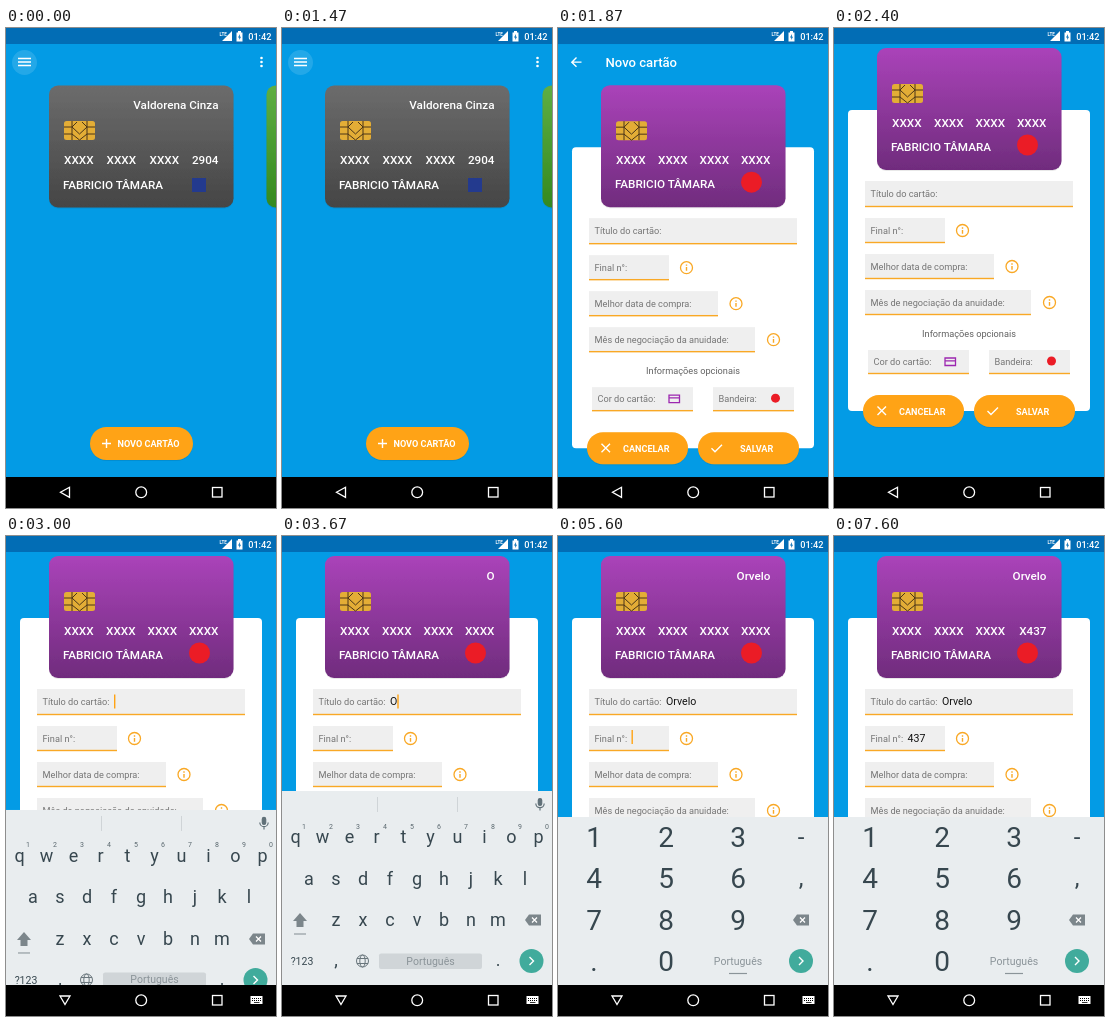
These frames come from a looping animation (270 by 480 pixels, 8000 ms). An HTML page:

```html
<!DOCTYPE html>
<html lang="pt">
<head>
<meta charset="utf-8">
<title>Novo cartão</title>
<style>
html, body { margin: 0; width: 100%; height: 100%; overflow: hidden; background: #000; }
svg { display: block; width: 100vw; height: 100vh; }
text { font-family: Roboto, "Noto Sans", sans-serif; font-size: 9.2px; }
.card text { fill: #fff; font-size: 11.7px; font-weight: 500; }
.mid { text-anchor: middle; }
.end { text-anchor: end; }
.btn text { fill: #fff; font-size: 9.1px; font-weight: 700; }
.line { fill: none; stroke: #fff; stroke-width: 1.4; }
.value { font-size: 10.6px; fill: #111; }
.key { fill: #37474f; text-anchor: middle; }
</style>
</head>
<body>
<svg viewBox="0 0 270 480" xmlns="http://www.w3.org/2000/svg">
  <defs>
    <linearGradient id="grey" x2="0" y2="1"><stop stop-color="#6c6c6c"/><stop offset="1" stop-color="#454545"/></linearGradient>
    <linearGradient id="purple" x2="0" y2="1"><stop stop-color="#aa43b9"/><stop offset="1" stop-color="#702c7d"/></linearGradient>
    <linearGradient id="green" x2="0" y2="1"><stop stop-color="#5fae43"/><stop offset="1" stop-color="#34891f"/></linearGradient>
    <filter id="shadow" x="-10%" y="-10%" width="120%" height="130%"><feDropShadow dx="0" dy=".6" stdDeviation=".7" flood-opacity=".15"/></filter>
    <clipPath id="fabClip"><rect x="84" y="399" width="103" height="33" rx="16.5"/></clipPath>
    <g id="chip">
      <rect x="58" y="93" width="31" height="19" rx="2.5" fill="#e3ad36"/>
      <path d="M58 99H66L73.500 106L81 99H89M58 106H66L73.500 112M89 106H81L73.500 112M66 93V112M81 93V112M66 99L71 94M81 99L76 94" fill="none" stroke="#4a3518"/>
    </g>
  </defs>

  <rect width="270" height="480"/>

  <g id="home">
    <rect y="16" width="270" height="433" fill="#039be5"/>
    <circle id="touch" cx="18.500" cy="34.500" r="12.500" fill="#fff" opacity=".13"/>
    <path class="line" d="M12 30.500H25M12 34H25M12 37.500H25"/>
    <g fill="#fff"><circle cx="255.500" cy="30" r="1.300"/><circle cx="255.500" cy="34" r="1.300"/><circle cx="255.500" cy="38" r="1.300"/></g>
    <g class="card">
      <rect x="43" y="57.500" width="184.500" height="122" rx="9" fill="url(#grey)" filter="url(#shadow)"/>
      <rect x="260.500" y="57.500" width="184" height="122" rx="9" fill="url(#green)" filter="url(#shadow)"/>
      <use href="#chip"/>
      <text class="end" x="212.500" y="81">Valdorena Cinza</text>
      <text x="58" y="136">XXXX</text><text x="100.500" y="136">XXXX</text><text x="143.500" y="136">XXXX</text>
      <text class="end" x="212.500" y="136">2904</text>
      <text x="57" y="160.500">FABRICIO TÂMARA</text>
      <rect x="186" y="150" width="14" height="14" fill="#233a8e"/>
    </g>
    <g class="btn">
      <rect x="84" y="399" width="103" height="33" rx="16.500" fill="#ffa314" filter="url(#shadow)"/>
      <circle id="ripple" cx="135" cy="416" fill="#fff" opacity=".3" clip-path="url(#fabClip)"/>
      <path class="line" d="M96 415.500H105M100.500 411V420"/>
      <text x="111.500" y="419">NOVO CARTÃO</text>
    </g>
  </g>

  <g id="form">
    <rect width="270" height="16" fill="#026db5"/>
    <rect y="16" width="270" height="433" fill="#039be5"/>
    <rect y="449" width="270" height="31"/>
    <g id="sheet">
      <path class="line" d="M23.500 34H14M18.500 29.300L13.800 34L18.500 38.700"/>
      <text x="47.500" y="39" fill="#fff" style="font-size:13.1px;font-weight:500">Novo cartão</text>
      <rect x="14" y="119" width="242" height="301" rx="4" fill="#fff"/>
      <g class="card">
        <rect x="43" y="57" width="184.500" height="122" rx="9" fill="url(#purple)" filter="url(#shadow)"/>
        <use href="#chip"/>
        <text id="cardTitle" class="end" x="212.500" y="80.500"></text>
        <text x="58" y="135.500">XXXX</text><text x="100" y="135.500">XXXX</text><text x="141.500" y="135.500">XXXX</text>
        <text id="cardEnd" class="end" x="212.500" y="135.500"></text>
        <text x="57" y="160">FABRICIO TÂMARA</text>
        <circle cx="193.500" cy="154" r="10.500" fill="#eb1c26"/>
      </g>
      <g id="fields"></g>
      <text class="mid" x="135" y="345.500" fill="#616161">Informações opcionais</text>
      <path d="M111 367h10.500v7.500h-10.500zM111 369.800h10.500" fill="none" stroke="#9c27b0" stroke-width="1.300"/>
      <circle cx="217.500" cy="370" r="4.500" fill="#eb1c26"/>
      <text id="title" class="value" x="108" y="206"></text>
      <text id="number" class="value" x="73.500" y="242.500"></text>
      <rect id="caret" width="1.400" height="14" fill="#ffa314"/>
      <g class="btn">
        <rect x="29" y="404" width="101" height="32" rx="16" fill="#ffa314" filter="url(#shadow)"/>
        <rect x="140" y="404" width="101" height="32" rx="16" fill="#ffa314" filter="url(#shadow)"/>
        <path class="line" d="M43.500 415.500L52 424M52 415.500L43.500 424M153.500 420L157 423.500L164 416.500"/>
        <text x="65" y="423.500">CANCELAR</text>
        <text x="182" y="423.500">SALVAR</text>
      </g>
    </g>
  </g>

  <rect width="270" height="16" fill="#026db5"/>
  <g fill="#fff">
    <text x="213.500" y="7.500" style="font-size:4.600px;font-weight:700">LTE</text>
    <path d="M226 3V13H216ZM230.500 4.500H232V3H235V4.500H236.500V13.500H230.500Z"/>
    <path d="M234 6L232 9.500H233.300V12L235 8.700H233.800Z" fill="#026db5"/>
    <text class="end" x="265.500" y="12" style="font-size:9.200px;font-weight:500">01:42</text>
  </g>

  <g id="letters">
    <rect y="255" width="270" height="194" fill="#e9edef"/>
    <path d="M95.500 261V276M175.500 261V276" stroke="#cfd4d7"/>
    <g fill="none" stroke="#607078" stroke-width="1.200"><rect x="256.300" y="262.500" width="3.400" height="7" rx="1.700" fill="#607078"/><path d="M253.800 267.500a4.200 4.200 0 0 0 8.400 0M258 272V274.500"/></g>
    <g id="alpha"></g>
    <path d="M18 377L25 385H21.500V391H14.500V385H11Z" fill="#7c868b"/>
    <path d="M12 398H24" stroke="#9aa3a7" stroke-width="1.300"/>
    <g fill="none" stroke="#69767c"><circle cx="80.500" cy="425" r="6"/><ellipse cx="80.500" cy="425" rx="2.700" ry="6"/><path d="M75 422.500H86M75 427.500H86"/></g>
    <rect x="97" y="417.500" width="103" height="15.500" rx="2" fill="#d0d5d8"/>
    <text class="mid" x="148.500" y="428.500" fill="#8b9499" style="font-size:10.5px">Português</text>
    <text class="key" x="20" y="429" style="font-size:10.5px">?123</text>
  </g>
  <g id="digits">
    <rect y="281" width="270" height="168" fill="#e9edef"/>
    <g id="pad"></g>
    <text class="mid" x="180" y="428.500" fill="#8b9499" style="font-size:10.5px">Português</text>
    <path d="M171 437.500H189" stroke="#8b9499" stroke-width="1.200"/>
  </g>

  <rect y="449" width="270" height="31" id="navCover"/>
  <g fill="none" stroke="#fff" stroke-width="1.300">
    <path id="back" d="M63.500 459.300V469.300L54.500 464.300Z"/>
    <path id="down" d="M54 460H64L59 468.500Z"/>
    <circle cx="135.200" cy="464.300" r="5.400"/>
    <rect x="206.500" y="459.500" width="9.500" height="9.500"/>
    <g id="keysIcon"><rect x="244.500" y="460" width="12" height="8" fill="#fff" stroke="none"/><path d="M246 462.500H255.500M246 464.500H255.500" stroke="#000" stroke-width="1" stroke-dasharray="1 1"/><path d="M248 466.500H253.500" stroke="#000" stroke-width=".8"/></g>
  </g>
</svg>
<script>
const $ = id => document.getElementById(id);
const show = (id, on) => $(id).setAttribute('display', on ? 'inline' : 'none');
const shift = (id, y) => $(id).setAttribute('transform', `translate(0 ${y})`);
const clamp = x => Math.max(0, Math.min(1, x));
const span = (t, from, length) => clamp((t - from) / length);
const smooth = x => x * x * (3 - 2 * x);
const out = (x, power) => 1 - (1 - x) ** power;

const field = (x, y, w, h, label, info) =>
  `<rect x="${x}" y="${y}" width="${w}" height="${h}" fill="#efefef"/>
   <rect x="${x}" y="${y + h - 1.2}" width="${w}" height="1.4" fill="#f9a825"/>
   <text x="${x + 5.5}" y="${y + h / 2 + 3}" fill="#757575">${label}</text>` +
  (info ? `<g transform="translate(${info} ${y + h / 2})"><circle r="6" fill="none" stroke="#f9a825" stroke-width="1.3"/>
   <path d="M0-3.200V-1.800M0-.6V3.200" stroke="#f9a825" stroke-width="1.4"/></g>` : '');
$('fields').innerHTML =
  field(31, 190, 208, 26, 'Título do cartão:') +
  field(31, 227, 80, 25, 'Final n°:', 128.5) +
  field(31, 263, 129, 25, 'Melhor data de compra:', 178) +
  field(31, 299, 166, 25, 'Mês de negociação da anuidade:', 215.5) +
  field(34, 359, 101, 24, 'Cor do cartão:') +
  field(155, 359, 81, 24, 'Bandeira:');

const key = (c, x, y, size) => `<text class="key" x="${x}" y="${y}" style="font-size:${size}px">${c}</text>`;
const row = (chars, x, y, step, size) => [...chars].map((c, i) => key(c, x + i * step, y, size)).join('');
const erase = (x, y) =>
  `<path d="M${x - 8} ${y}L${x - 4} ${y - 5.5}H${x + 8}V${y + 5.5}H${x - 4}Z" fill="#7c868b"/>
   <path d="M${x - 1} ${y - 2.5}l5 5m0-5l-5 5" stroke="#fff" stroke-width="1.2"/>`;
const enter = (x, y) =>
  `<circle cx="${x}" cy="${y}" r="12" fill="#41ab9c"/><path class="line" d="M${x - 2} ${y - 4}l4 4l-4 4"/>`;
$('alpha').innerHTML =
  `<g opacity=".8">${row('1234567890', 22, 292.5, 27, 7)}</g>` +
  row('qwertyuiop', 13.5, 307, 27, 18) + row('asdfghjkl', 27, 348.5, 27, 18) +
  row('zxcvbnm', 54, 390, 27, 18) + row(',.', 54, 430, 162, 18) +
  erase(251, 384) + enter(249.5, 425);
$('pad').innerHTML =
  ['123', '456', '789', '.0'].map((r, i) => row(r, 36, 311 + i * 41.3, 72, 28)).join('') +
  key('-', 243, 309, 24) + key(',', 243, 350, 24) + erase(243, 384) + enter(243, 425);

const LOOP = 8000, OPEN = 1639, KEYS = 2850, SWITCH = 5130;
const titleTimes = [3600, 3800, 4070, 4270, 4470, 4670];
const digitTimes = [6270, 6800, 7270];
const typed = (word, times, t) => word.slice(0, times.filter(x => t >= x).length);

function draw(t) {
  // Home: button press, then the form window fades and slides in.
  show('touch', t < 1480);
  $('ripple').setAttribute('r', 55 * out(span(t, 1470, 260), 2));
  show('home', t < OPEN + 350);
  show('form', t >= OPEN);
  $('form').setAttribute('opacity', out(span(t, OPEN, 200), 4));
  shift('form', 38.4 * (1 - out(span(t, OPEN, 350), 5)));
  shift('sheet', -37 * smooth(span(t, 2040, 300)));

  // Keyboards
  const up = t >= KEYS;
  show('letters', up && t < SWITCH);
  shift('letters', 194 * (1 - out(span(t, KEYS, 280), 3)));
  show('digits', t >= SWITCH);
  show('navCover', up);
  show('back', !up);
  show('down', up);
  show('keysIcon', up);

  // Typing
  const title = typed('Orvelo', titleTimes, t), number = typed('437', digitTimes, t);
  $('title').textContent = $('cardTitle').textContent = title;
  $('number').textContent = number;
  $('cardEnd').textContent = 'XXXX'.slice(number.length) + number;
  const inTitle = t >= 2700 && t < SWITCH;
  const blink = t >= titleTimes[0] || (t - 2700) % 1000 < 500;
  const inNumber = t >= SWITCH && t < 6070 || t >= digitTimes[0] && t < 7600;
  show('caret', inTitle && blink || inNumber);
  const target = $(inTitle ? 'title' : 'number');
  const width = target.textContent ? target.getComputedTextLength() : 0;
  $('caret').setAttribute('x', +target.getAttribute('x') + width);
  $('caret').setAttribute('y', inTitle ? 195.5 : 231);
}

const start = performance.now();
function frame() {
  draw((performance.now() - start) % LOOP);
  requestAnimationFrame(frame);
}
draw(0);
requestAnimationFrame(frame);
</script>
</body>
</html>
```
